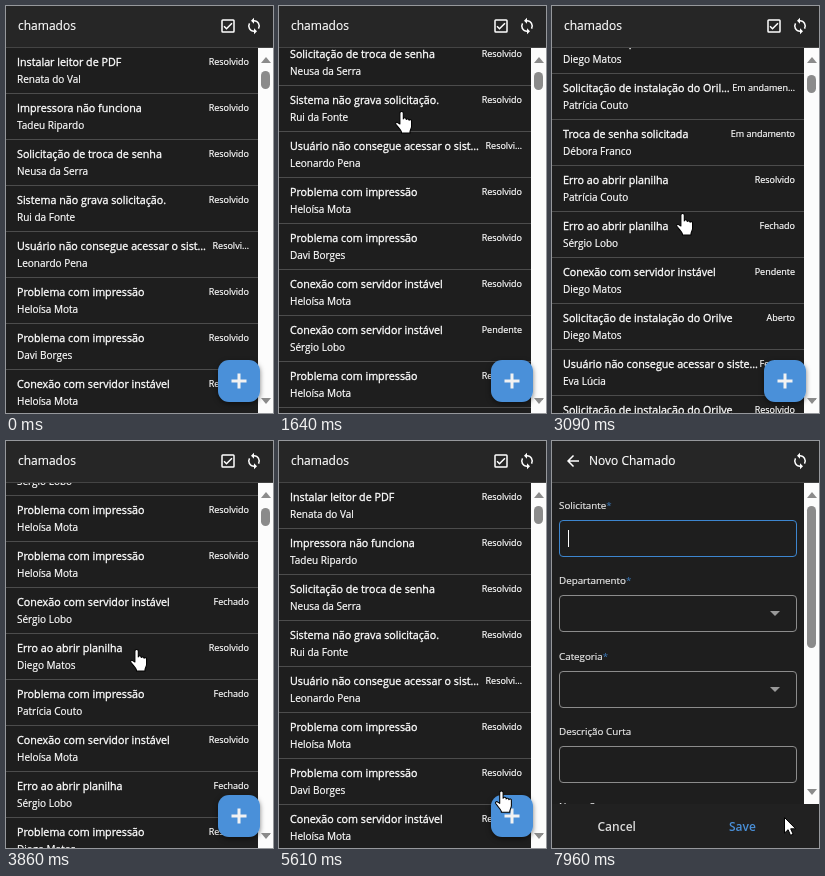
Animation, 267 px wide and 407 px high, one loop 8000 ms. Source, as an HTML page:

```html
<!DOCTYPE html>
<html lang="pt-BR">
<head>
<meta charset="utf-8">
<title>chamados</title>
<style>
html, body { margin: 0; width: 100%; height: 100%; overflow: hidden; background: #1e1e1e; }
body { position: relative; font-family: "Open Sans", sans-serif; color: #fff; }
div, svg { position: absolute; white-space: pre; }
.fill { left: 0; top: 0; width: 267px; height: 407px; }
.head { left: 0; top: 0; width: 267px; height: 41px; background: #262626; border-bottom: 1px solid #444; }
.head div { top: 10px; font-size: 12px; line-height: 20px; -webkit-text-stroke: .15px #fff; }
.head svg { width: 18px; height: 18px; top: 11px; fill: none; stroke: #fff; stroke-width: 2; }
.head .solid { fill: #fff; stroke: none; }
.view { left: 0; top: 42px; width: 252px; overflow: hidden; background: #1e1e1e; }
.row { left: 0; width: 252px; height: 45px; border-bottom: 1px solid #4c4c4c; }
.row div { line-height: 16px; -webkit-text-stroke: .2px #fff; }
.subject { left: 11px; top: 6px; font-size: 10.72px; }
.row .subject { -webkit-text-stroke-width: .32px; }
.who { left: 11px; top: 23px; font-size: 10px; }
.state { right: 9px; top: 5.5px; font-size: 9px; }
.bar { left: 252px; top: 42px; width: 15px; background: #fcfcfc; }
.bar i { position: absolute; left: 3px; width: 9px; border-radius: 5px; background: #8b8b8b; }
.tri { width: 0; height: 0; border: 5px solid transparent; }
.up { border-bottom: 6px solid #8b8b8b; border-top: 0; left: 2.5px; top: 9px; }
.down { border-top: 6px solid #8b8b8b; border-bottom: 0; left: 2.5px; bottom: 9px; }
#fab, #shade { left: 211.5px; top: 354px; width: 42px; height: 42px; border-radius: 11px; }
#fab { overflow: hidden; background: #4a90d9; }
#ripple { width: 80px; height: 80px; left: -20px; top: -18px; border-radius: 50%; background: #8f8f8f; }
#fab svg { left: 0; top: 0; width: 42px; height: 42px; stroke: #f2f2f2; stroke-width: 3; }
#tip { left: 164px; top: 363px; width: 29px; height: 24px; border-radius: 3px; background: #5e5e5e; font-size: 9px; line-height: 24px; font-weight: 600; text-align: center; }
.label { left: 7px; font-size: 9.8px; line-height: 14px; color: #e8e8e8; -webkit-text-stroke: .2px #e8e8e8; }
.label span { color: #3a78b8; -webkit-text-stroke: 0; }
.box { left: 7px; width: 236px; height: 35px; border: 1px solid #8c8c8c; border-radius: 4px; }
.box.on { border-color: #3d86cf; }
.box .down { left: 210px; bottom: 15px; border-top: 5px solid #9a9a9a; }
#caret { left: 8px; top: 9px; width: 1px; height: 17px; background: #fff; }
.foot { left: 0; top: 363px; width: 267px; height: 44px; background: #212121; font-size: 12px; font-weight: 600; }
.foot div { top: 13px; line-height: 20px; }
.cursor { left: 0; top: 0; width: 20px; height: 25px; overflow: visible; fill: #fff; stroke: #000; stroke-linejoin: round; }
#arrow { left: 231.5px; top: 375.5px; }
</style>
</head>
<body>
<div id="list" class="fill">
  <div class="head"><div style="left:12px">chamados</div></div>
  <div class="view" style="height:365px"><div id="rows"></div></div>
  <div class="bar" style="height:365px"><div class="tri up"></div><i id="thumb" style="height:18px"></i><div class="tri down"></div></div>
  <div id="shade"></div>
  <div id="fab"><div id="ripple"></div><svg><path d="M13.5 21h15M21 13.5v15"/></svg></div>
  <div id="tip">Add</div>
</div>
<div id="form" class="fill">
  <div class="head"><div style="left:37px">Novo Chamado</div></div>
  <div class="view" id="fields" style="height:321px"></div>
  <div class="bar" style="height:321px"><div class="tri up"></div><i style="top:23px;height:142px"></i><div class="tri down"></div></div>
  <div class="foot"><div style="left:45.5px;color:#dcdcdc">Cancel</div><div style="left:177px;color:#4a90d9">Save</div></div>
</div>
<svg id="hand" class="cursor"><path transform="translate(-.9) scale(1.06 1)" d="M5 13V2.2a1.6 1.6 0 0 1 3.2 0V8a1.4 1.4 0 0 1 2.8.6a1.4 1.4 0 0 1 2.6.7a1.3 1.3 0 0 1 2.4.9v5.3c0 2-1.5 3.5-1.5 5.5v1H6.5v-1C6 19 3 16 1.2 13.2c-.8-1.4.8-2.6 2-1.4z"/></svg>
<svg id="arrow" class="cursor"><path d="M.5.5v15.6l3.6-3.4 2.4 5.6 2.6-1.1-2.4-5.4h5z"/></svg>
<script>
const LOOP = 8000;
const $ = id => document.getElementById(id);

const half = '<path d="M12 5a7 7 0 0 1 6 10.5"/><path class="solid" d="M12 1L8 5l4 4z"/>';
const icons = {
  check: '<rect x="4" y="4" width="16" height="16" rx="1"/><path d="M6.7 12.3l3.3 3.3 7.3-7.3"/>',
  sync: `${half}<g transform="rotate(180 12 12)">${half}</g>`,
  back: '<path d="M20 12H5M12.7 4.7L5.4 12l7.3 7.3"/>'
};
function addIcon(view, name, x) {
  $(view).querySelector('.head').insertAdjacentHTML('beforeend',
    `<svg viewBox="0 0 24 24" style="left:${x}px">${icons[name]}</svg>`);
}
addIcon('list', 'check', 213);
addIcon('list', 'sync', 239);
addIcon('form', 'back', 11.5);
addIcon('form', 'sync', 239);

const print = 'Problema com impressão', link = 'Conexão com servidor instável';
const sheet = 'Erro ao abrir planilha', install = 'Solicitação de instalação do Orilve';
const helo = 'Heloísa Mota', sergio = 'Sérgio Lobo', diego = 'Diego Matos', pat = 'Patrícia Couto';
const done = 'Resolvido', open = 'Aberto', wait = 'Pendente', shut = 'Fechado';
const pick = (list, i) => list[i % list.length];
const middle = Array.from({ length: 7 }, (_, i) =>
  [pick([print, link, sheet], i), pick([helo, sergio, diego, pat], i), pick([done, shut], i)]);
const tickets = [
  ['Instalar leitor de PDF', 'Renata do Val', done],
  ['Impressora não funciona', 'Tadeu Ripardo', done],
  ['Solicitação de troca de senha', 'Neusa da Serra', done],
  ['Sistema não grava solicitação.', 'Rui da Fonte', done],
  ['Usuário não consegue acessar o sist…', 'Leonardo Pena', 'Resolvi…'],
  [print, helo, done],
  [print, 'Davi Borges', done],
  [link, helo, done],
  [link, sergio, wait],
  [print, helo, done],
  ...middle,
  [sheet, diego, done],
  ['Solicitação de instalação do Oril…', pat, 'Em andamen…'],
  ['Troca de senha solicitada', 'Débora Franco', 'Em andamento'],
  [sheet, pat, done],
  [sheet, sergio, shut],
  [link, diego, wait],
  [install, diego, open],
  ['Usuário não consegue acessar o siste…', 'Eva Lúcia', shut],
  [install, diego, done]
];
$('rows').innerHTML = tickets.map(([subject, who, state], i) =>
  `<div class="row" style="top:${i * 46}px"><div class="subject">${subject}</div>` +
  `<div class="who">${who}</div><div class="state">${state}</div></div>`).join('');

const select = '<div class="tri down"></div>';
const fields = [['Solicitante', '*', '<div id="caret"></div>'], ['Departamento', '*', select],
  ['Categoria', '*', select], ['Descrição Curta', '', ''], ['Nome Setor', '', '']];
$('fields').innerHTML = fields.map(([name, star, inner], i) => {
  const y = 37 + i * 75.3;
  return `<div class="label" style="top:${y - 21}px">${name}<span>${star}</span></div>` +
    `<div class="box${i ? '' : ' on'}" style="top:${Math.round(y)}px">${inner}</div>`;
}).join('');

// Progress in n even steps, the first at a and the last at b
function steps(t, a, b, n) {
  if (t < a) return 0;
  if (t >= b) return 1;
  return (1 + Math.floor((t - a) / (b - a) * (n - 1))) / n;
}
const easeOut = (p, k) => 1 - (1 - p) ** k;

function render(t) {
  const enter = steps(t, 500, 1270, 16);
  const roll = steps(t, 2790, 3090, 6);
  const nudge = steps(t, 3560, 3560, 1);
  const drift = steps(t, 4990, 5040, 2);
  const reach = steps(t, 5210, 5960, 16);
  const press = steps(t, 6570, 7020, 8);
  const fade = steps(t, 7690, 7960, 5);

  const up = steps(t, 3760, 3860, 2) + steps(t, 4160, 4210, 2);
  const scroll = 400 * steps(t, 1640, 1840, 4) + 100 * steps(t, 2520, 2520, 1) + 302 * roll - 401 * up;
  const x = 196 - 79.5 * easeOut(enter, 2) + 8 * roll - 5 * drift + 106.5 * easeOut(reach, 2.9);
  const y = 396 - 291 * easeOut(enter, 2) + 102 * roll + nudge + drift + 165 * easeOut(reach, 2.3);

  $('rows').style.top = -scroll + 'px';
  $('thumb').style.top = 23 + scroll / 200 + 'px';
  $('tip').style.opacity = Math.max(0, reach * 4 - 3);
  $('ripple').style.transform = `scale(${press})`;
  $('ripple').style.opacity = press ? .45 : 0;
  $('shade').style.boxShadow = `0 ${2 + press}px ${5 + 4 * press}px rgba(0,0,0,.5)`;
  $('form').style.opacity = fade;
  $('caret').style.opacity = fade === 1 ? 1 : 0;
  $('hand').style.transform = `translate(${x}px,${y}px)`;
  $('hand').style.visibility = enter && !fade ? 'visible' : 'hidden';
  $('arrow').style.visibility = fade ? 'visible' : 'hidden';
}
const start = performance.now();
function loop() {
  render((performance.now() - start) % LOOP);
  requestAnimationFrame(loop);
}
loop();
</script>
</body>
</html>
```
